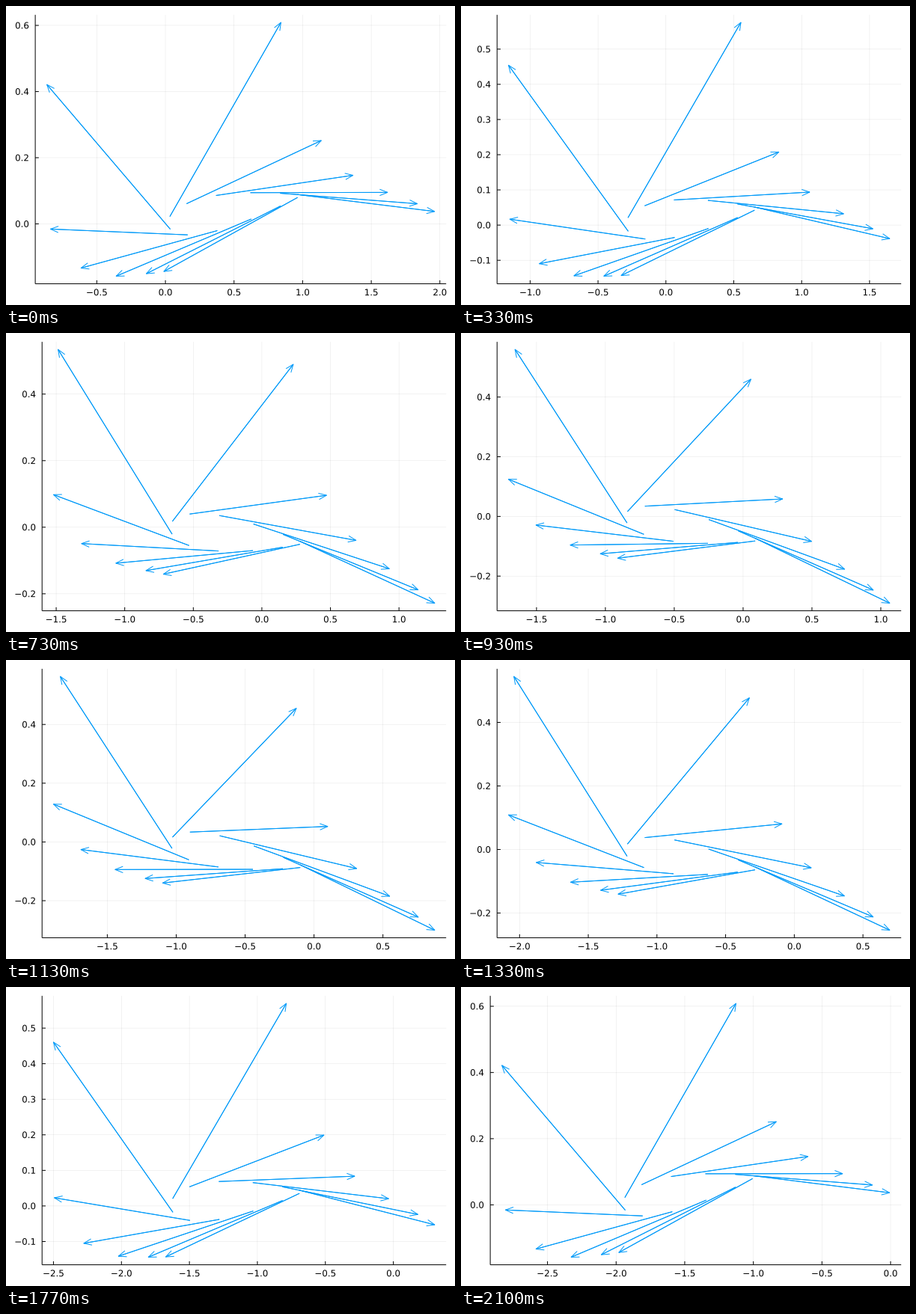
Write a matplotlib script that moves like this. It is 600x400 px and loops after 2.13 s.

```python
import numpy as np
import matplotlib.pyplot as plt
from matplotlib.animation import FuncAnimation
from matplotlib.collections import LineCollection, PathCollection
from matplotlib.textpath import TextPath

W, H = 600, 400
POSES, LOOP_MS, TICK_MS = 64, 2130, 10
PX = 0.72                      # one pixel in points at 100 dpi
TOP, BOTTOM, RIGHT = 11.81, 371.61, 588.19
BLUE = "#009af9"
FONT = 11.85
TICK = 4.72
HEAD_LEN, HEAD_HALF = 10.5, 4.2


def foil_panels(n=6, thick=0.12, inset=0.05):
    """Collocation points and unit tangents of a symmetric foil."""
    s = np.linspace(-np.pi, np.pi, 2 * n + 1)
    x = 0.5 * (1 - np.cos(s))
    y = 5 * thick * (0.2969 * np.sqrt(x) - 0.126 * x - 0.3516 * x**2
                     + 0.2843 * x**3 - 0.1036 * x**4) * np.sign(s)
    pts = np.column_stack([x, y])
    d = np.diff(pts, axis=0)
    tan = d / np.hypot(d[:, 0], d[:, 1])[:, None]
    normal = np.column_stack([-tan[:, 1], tan[:, 0]])
    mid = (pts[1:] + pts[:-1]) / 2
    return mid - inset * np.abs(mid[:, 1:]) * normal, tan


MID, TAN = foil_panels()


def pose(k):
    """Arrow tails and tips while the foil pitches and swims left."""
    a = np.radians(5) * np.cos(2 * np.pi * k / POSES)
    rot = np.array([[np.cos(a), np.sin(a)], [-np.sin(a), np.cos(a)]])
    tail = MID @ rot - [k / 32, 0]
    return tail, tail + TAN @ rot


def ticks(lo, hi):
    """Coarsest step that still gives four ticks."""
    for step in (1, 0.5, 0.2, 0.1):
        i = np.arange(np.ceil(lo / step), np.floor(hi / step) + 1)
        if len(i) >= 4:
            break
    return i * step


def label(v):
    return f"{v + 0.0:.1f}".replace("-", "\u2212")


def text_path(s, x, y, align):
    width = sum(0.838 if c == "\u2212" else 0.318 if c == "." else 0.636
                for c in s) * FONT
    return TextPath((x - align * width, H - y), s, size=FONT)


def add_lines(segs, color, width, **kw):
    flipped = [[(x, H - y) for x, y in seg] for seg in segs]
    lines = LineCollection(flipped, colors=color, linewidths=width * PX,
                           capstyle="butt", joinstyle="round", **kw)
    lines.set_snap(False)
    ax.add_collection(lines, autolim=False)


def head(p, q):
    u = (q - p) / np.hypot(*(q - p))
    n = np.array([-u[1], u[0]])
    base = q - HEAD_LEN * u
    return [base + HEAD_HALF * n, q, base - HEAD_HALF * n]


def draw(j):
    # 30 poses per second, each change rounded to the 10 ms clock
    k = int((j + 0.5) * TICK_MS * 30 / 1000)
    for old in list(ax.collections):
        old.remove()

    tail, tip = pose(k)
    pts = np.vstack([tail, tip])
    lo, hi = pts.min(axis=0), pts.max(axis=0)
    pad = 0.03 * (hi - lo)
    lo, hi = lo - pad, hi + pad

    xt, yt = ticks(lo[0], hi[0]), ticks(lo[1], hi[1])
    left = 48.2 if yt[0] < 0 else 39.1
    size = np.array([RIGHT - left, TOP - BOTTOM])

    def to_px(p):
        return [left, BOTTOM] + (p - lo) / (hi - lo) * size

    xs = to_px(np.column_stack([xt, 0 * xt]))[:, 0]
    ys = to_px(np.column_stack([0 * yt, yt]))[:, 1]

    grid = [[(x, BOTTOM), (x, TOP)] for x in xs]
    grid += [[(left, y), (RIGHT, y)] for y in ys]
    add_lines(grid, "black", 0.5, alpha=0.1, zorder=1)

    axes = [[(left, BOTTOM), (RIGHT, BOTTOM)], [(left, BOTTOM), (left, TOP)]]
    axes += [[(x, BOTTOM), (x, BOTTOM - TICK)] for x in xs]
    axes += [[(left, y), (left + TICK, y)] for y in ys]
    add_lines(axes, "black", 1, zorder=2)

    texts = [text_path(label(v), x, 387.2, 0.5) for v, x in zip(xt, xs)]
    texts += [text_path(label(v), left - 8.2, y + 4.32, 1)
              for v, y in zip(yt, ys)]
    ax.add_collection(PathCollection(texts, facecolors="black", linewidths=0,
                                     zorder=2), autolim=False)

    # Shafts are stroked twice, which firms up their soft edges.
    shafts = list(zip(to_px(tail), to_px(tip)))
    add_lines(shafts * 2 + [head(p, q) for p, q in shafts], BLUE, 1, zorder=3)
    return []


fig = plt.figure(figsize=(W / 100, H / 100), dpi=100, facecolor="white")
ax = fig.add_axes([0, 0, 1, 1], xlim=(0, W), ylim=(0, H))
ax.axis("off")
anim = FuncAnimation(fig, draw, frames=LOOP_MS // TICK_MS,
                     init_func=lambda: [], interval=TICK_MS,
                     repeat=True, repeat_delay=0)
plt.show()
```
